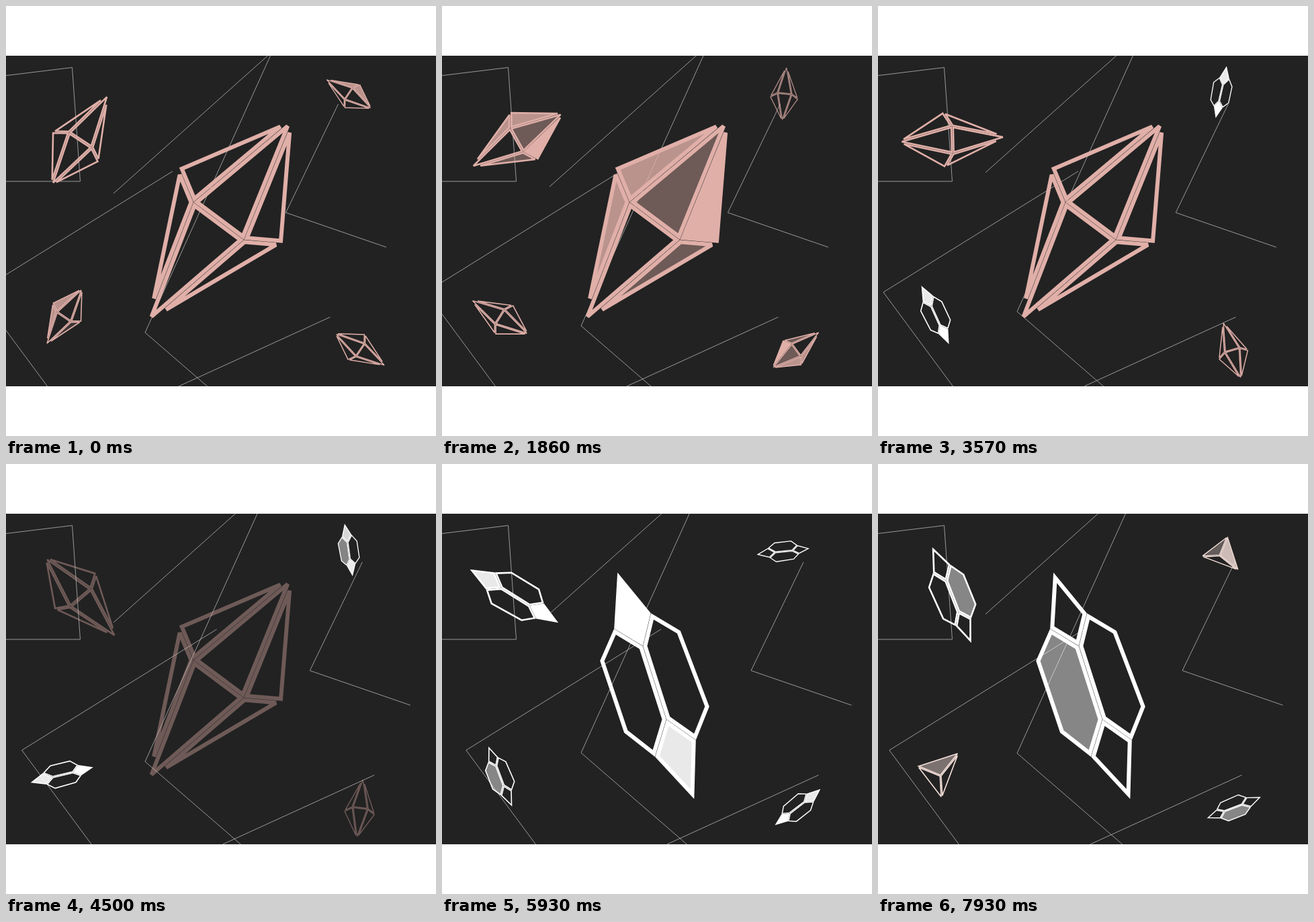
These frames come from a looping animation (640 by 640 pixels, 8000 ms). An HTML page with a canvas:

```html
<!DOCTYPE html>
<html lang="en">
<head>
<meta charset="utf-8">
<title>Drifting crystals</title>
<style>
  html, body { margin: 0; width: 100%; height: 100%; overflow: hidden; background: #fff; }
  canvas { display: block; width: 640px; height: 640px; }
</style>
</head>
<body>
<canvas id="stage" width="640" height="640"></canvas>
<script>
const ctx = document.getElementById('stage').getContext('2d');
const LOOP = 8, PEAK = 3.73;
const FIRST_LIFE = 4.7, SECOND_LIFE = 4.5, FADE = .5;
const PIVOT = { x: 316, y: 320 };
const INSET = 3.2, STROKE = 6;

const clamp = v => Math.min(1, Math.max(0, v));
const sine = p => (1 - Math.cos(Math.PI * p)) / 2;
const point = (x, y) => ({ x, y });

// Moves every edge of a convex polygon inwards by the same distance.
function inset(polygon, distance) {
  const n = polygon.length;
  const area = polygon.reduce((sum, p, i) => {
    const q = polygon[(i + 1) % n];
    return sum + p.x * q.y - q.x * p.y;
  }, 0);
  const toward = (p, q) => {
    const length = Math.hypot(q.x - p.x, q.y - p.y);
    return point((q.x - p.x) / length, (q.y - p.y) / length);
  };
  return polygon.map((p, i) => {
    const a = toward(polygon[(i + n - 1) % n], p);
    const b = toward(p, polygon[(i + 1) % n]);
    const k = distance / (a.x * b.y - a.y * b.x);
    const side = Math.sign(area) * k;
    return point(p.x + (b.x - a.x) * side, p.y + (b.y - a.y) * side);
  });
}

// Each face is named by its corners; glow gives the middle, half length and height of its fill.
function makeShape(color, corners, faces) {
  return {
    color,
    faces: faces.map(([names, ...glow]) => ({
      outline: inset([...names].map(name => corners[name]), INSET),
      glow
    }))
  };
}

const crystal = makeShape('#e0afa8', {
  N: point(427, 168), S: point(209, 473),
  L: point(257.5, 240.5), R: point(412, 353),
  A: point(279, 292), B: point(354, 348)
}, [
  ['LNA', 2.1, .7, .8], ['NAB', 1.5, .7, .4], ['NRB', 1.5, .7, 1],
  ['LSA', 2.1, .7, .8], ['ASB', .75, .7, 1], ['BSR', 1.6, .7, .4]
]);

const petals = makeShape('#ffffff', {
  T: point(261, 161), U: point(375.5, 499),
  A: point(299, 271), B: point(334, 380),
  C: point(256, 245), D: point(235, 293), E: point(271, 400), F: point(317, 436),
  G: point(311, 222), H: point(355, 248), I: point(398, 361), J: point(378, 411)
}, [
  ['TCAG', 1.65, 1, 1], ['UFBJ', 1.65, 1, .9],
  ['CDEFBA', 3.25, .42, .45], ['GHIJBA', 2.4, .3, .45]
]);

const pyramid = makeShape('#f6e0da', {
  P: point(343, 453), Q: point(451, 204), R: point(215, 268), O: point(342, 327)
}, [
  ['RQO', 1.4, .6, .8], ['RPO', 1.5, .4, .5], ['QPO', 2.2, .4, .5]
]);

// swap: when the crystal gives way; rest: when the swing is back at its base angle.
const figure = (x, y, scale, base, swing, rest, swap) => ({ x, y, scale, base, swing, rest, swap });
const figures = [
  figure(316, 320, 1, 0, 0, 6.57, 4.7),
  figure(111, 199.3, .432, 176.5, -306, 6.57, 4.7),
  figure(510, 130.3, .222, 87.2, 124, 6.57, 2.23),
  figure(86, 462.4, .27, -2.8, 177, 5.38, 2.5),
  figure(527.3, 512, .243, -92.8, -141, 6.57, 4.7)
];

function path(points) {
  ctx.beginPath();
  points.forEach(p => ctx.lineTo(p.x, p.y));
}

function drawShape(shape, age, life) {
  const fadeIn = shape === crystal ? 1 : clamp(age / FADE);
  const alpha = Math.min(fadeIn, clamp((life - age) / FADE));
  ctx.fillStyle = ctx.strokeStyle = shape.color;
  for (const { outline, glow: [middle, half, height] } of shape.faces) {
    path(outline);
    ctx.closePath();
    ctx.globalAlpha = alpha * height * clamp(2.4 * (1 - Math.abs(age - middle) / half));
    ctx.fill();
    ctx.globalAlpha = alpha;
    ctx.stroke();
  }
}

function drawFigure(f, t) {
  const turn = t < PEAK ? sine(t / PEAK) : sine(clamp((f.rest - t) / (f.rest - PEAK)));
  const age = t - f.swap;
  ctx.save();
  ctx.translate(f.x, f.y);
  ctx.rotate((f.base + f.swing * turn) * Math.PI / 180);
  ctx.scale(f.scale, f.scale);
  ctx.translate(-PIVOT.x, -PIVOT.y);
  ctx.lineWidth = STROKE;
  ctx.miterLimit = 3;
  if (age < 0) drawShape(crystal, age + FIRST_LIFE, FIRST_LIFE);
  else if (age < SECOND_LIFE) drawShape(petals, age, SECOND_LIFE);
  else drawShape(pyramid, age - SECOND_LIFE, Infinity);
  ctx.restore();
}

function drawLine(dx, dy, ...points) {
  path(points.map(([x, y]) => point(x + dx, y + dy)));
  ctx.stroke();
}

function drawLines(t) {
  const u = t < 6 ? t / 6 : 2 - t / 6;
  const slide = 78 * (.88 * sine(u) + .12 * u);
  const drift = 43.8 * sine(t / 6.26);
  const lift = -58.8 * sine(t / 6.88);
  ctx.strokeStyle = '#a6a6a6';
  ctx.lineWidth = .9;
  drawLine(0, 0, [0, 103.5], [98.5, 91.5], [110.5, 261], [0, 261]);
  drawLine(0, lift, [619, -131], [160, 279]);
  drawLine(0, lift, [486.8, -132], [207, 486], [484.5, 726]);
  drawLine(slide, 0, [248, 246], [-42, 426], [61.5, 566]);
  drawLine(slide, 0, [482.5, 463], [257, 566]);
  drawLine(drift, 0, [494.5, 146], [416.5, 307.5], [566, 359]);
}

function render(t) {
  ctx.fillStyle = '#fff';
  ctx.fillRect(0, 0, 640, 640);
  ctx.save();
  ctx.beginPath();
  ctx.rect(0, 74, 640, 492);
  ctx.clip();
  ctx.fillStyle = '#222';
  ctx.fillRect(0, 74, 640, 492);
  drawLines(t);
  figures.forEach(f => drawFigure(f, t));
  ctx.restore();
}

const start = performance.now();
function tick() {
  render((performance.now() - start) / 1000 % LOOP);
  requestAnimationFrame(tick);
}
tick();
</script>
</body>
</html>
```
